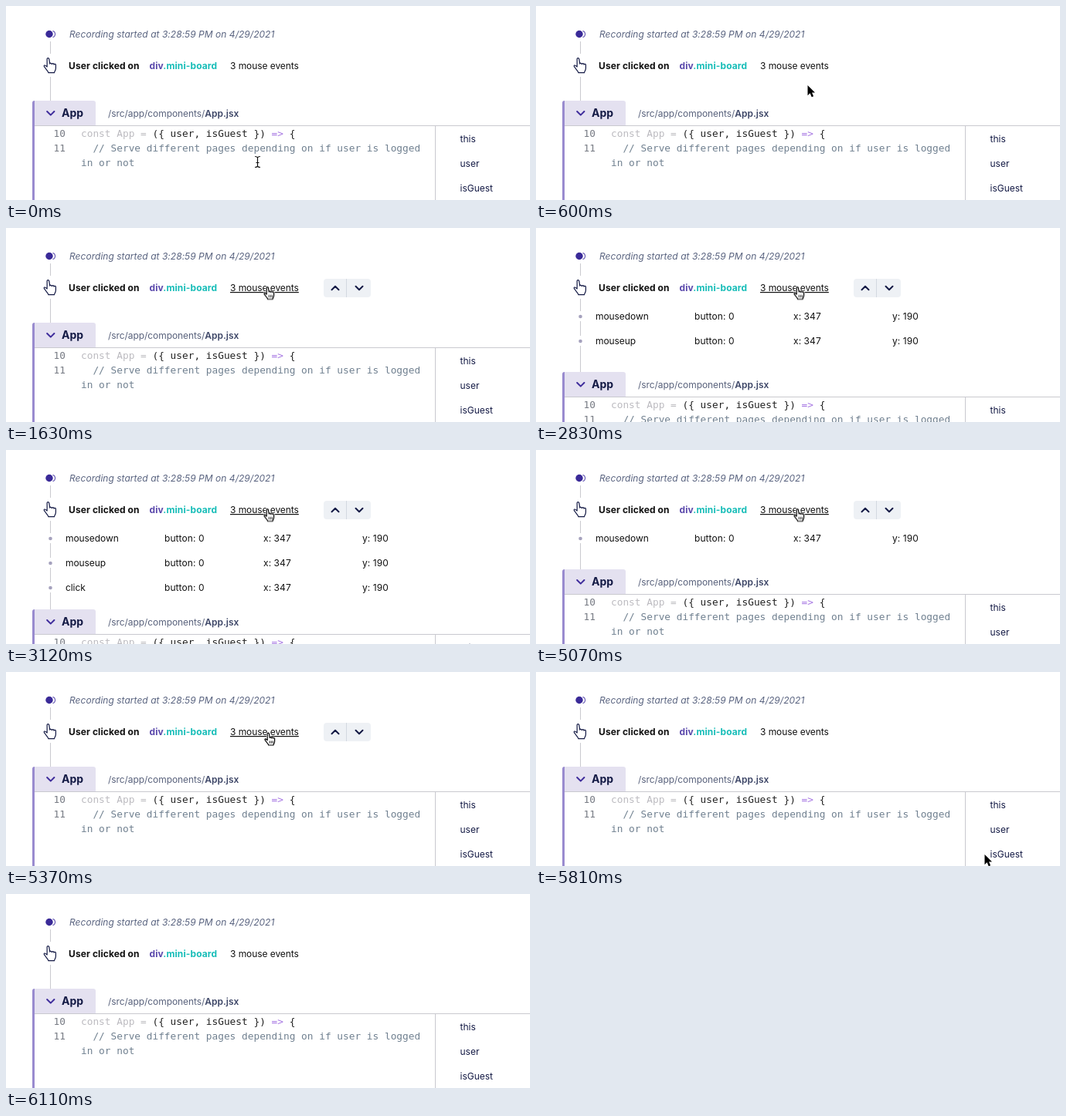
An HTML page that plays this animation: 678 px wide and 252 px high, repeating every 6410 ms.

```html
<!DOCTYPE html>
<html lang="en">
<head>
<meta charset="utf-8">
<title>Event timeline</title>
<style>
html, body { margin: 0; width: 100%; height: 100%; overflow: hidden; background: #fff; }
svg { display: block; width: 678px; height: 252px; font: 12px Inter, sans-serif; fill: #111; }
text { white-space: pre; }
.semi { font-weight: 600; letter-spacing: 0; }
.bold { font-weight: 700; letter-spacing: .1px; }
.tight { letter-spacing: -.07px; }
.loose { letter-spacing: .08px; }
.code { font: 12.8px "DejaVu Sans Mono", monospace; }
.line { stroke: #c9c9cf; fill: none; }
.mark { fill: none; stroke-width: 2; stroke-linecap: round; stroke-linejoin: round; }
.navy { fill: #141a45; }

/* every change in the scene is a hard cut */
.anim { animation: 6410ms step-end infinite; }
#panel { animation-name: panel; }
#chevron { animation-name: chevron; }
#down { animation-name: down; }
#up { animation-name: up; }
#click { animation-name: click; }
#under { animation-name: under; text-underline-offset: 1.5px; text-decoration-thickness: 1px; }
#nav { animation-name: nav; }
#ibeam { animation-name: ibeam; }
#arrow { animation-name: arrow; }
#hand { animation-name: hand; }
.hot { animation-name: hot; }
.cold { animation-name: cold; }

@keyframes panel {
  0%, 83.77% { transform: translateY(0); }
  44.14% { transform: translateY(64px); }
  48.67% { transform: translateY(84px); }
  79.09% { transform: translateY(32px); }
}
@keyframes chevron {
  0%, 79.09% { transform: translateY(0); }
  72.07% { transform: translateY(-1px); }
}
@keyframes down { 0%, 83.77% { opacity: 0; } 44.14% { opacity: 1; } }
@keyframes up { 0%, 79.09% { opacity: 0; } 44.14% { opacity: 1; } }
@keyframes click { 0%, 79.09% { opacity: 0; } 48.67% { opacity: 1; } }
@keyframes under { 0%, 86.11% { text-decoration-line: none; } 16.22% { text-decoration-line: underline; } }
@keyframes nav { 0%, 88.45% { opacity: 0; } 16.22% { opacity: 1; } }
@keyframes hot { 0%, 95.31% { opacity: 0; } 92.97% { opacity: 1; } }
@keyframes cold { 0%, 95.31% { opacity: 1; } 92.97% { opacity: 0; } }
@keyframes ibeam { 0% { opacity: 1; } 2.34% { opacity: 0; } }
@keyframes arrow {
  0%, 16.22%, 92.97% { transform: translate(-99px, 0); }
  2.34% { transform: translate(359px, 244px); }
  4.68% { transform: translate(365px, 239px); }
  7.02% { transform: translate(364px, 220px); }
  9.36% { transform: translate(350px, 102px); }
  11.54% { transform: translate(337px, 68px); }
  13.88% { transform: translate(334px, 76px); }
  86.11% { transform: translate(377px, 131px); }
  88.45% { transform: translate(427px, 162px); }
  90.63% { transform: translate(579px, 236px); }
}
@keyframes hand {
  0%, 86.11% { transform: translate(-99px, 0); }
  16.22%, 25.42% { transform: translate(333px, 75.5px); }
  18.56% { transform: translate(329px, 76.5px); }
  83.77% { transform: translate(334px, 78px); }
}
</style>
</head>
<body>
<svg viewBox="0 0 678 252">
  <defs>
    <path id="finger" stroke-linejoin="round" d="M4.2 10.6C3 9.4 2 8.6 1.3 9 .5 9.5 1.2 10.6 2 11.6L4.6 15C5.2 16 5.5 16 5.6 17H12C12 15.8 13.6 14.5 13.6 12V8.6C13.6 7.2 11.8 7.2 11.6 8.2 11.5 6.6 9.5 6.6 9.3 7.8 9 6.3 7.4 6.3 7.2 7.3L6.4 2.2C6.1.6 4 .8 4.2 2.5z"/>
    <g id="dot">
      <rect x="50" y="-7" width="14" height="13" fill="#fff"/>
      <circle cx="57.5" r="2.3" fill="#a5a1bd"/>
    </g>
    <g id="values" class="loose">
      <text x="205" y="4">button: 0</text>
      <text x="333" y="4">x: 347</text>
      <text x="461" y="4">y: 190</text>
    </g>
  </defs>

  <path class="line" d="M57.5 46V62M57.5 92V210"/>
  <circle cx="56" cy="36.5" r="4.7" fill="#3a2a98"/>
  <path d="M60.5 32.2Q63.6 33.4 63.6 36.5T60.5 40.8" fill="none" stroke="#6a5db5" stroke-width="1.1"/>
  <text x="82" y="41" font-style="italic" letter-spacing=".03" fill="#5a6480">Recording started at 3:28:59 PM on 4/29/2021</text>

  <use href="#finger" transform="translate(48.1 66.3) scale(1.2)" fill="#fff" stroke="#141a45"/>
  <text class="bold" x="81" y="82">User clicked on</text>
  <text class="bold" x="185.5" y="82" fill="#5a48ab">div<tspan fill="#17bdb8">.mini-board</tspan></text>
  <text id="under" class="anim tight" x="290" y="82">3 mouse events</text>

  <g id="nav" class="anim">
    <rect x="411" y="66" width="61" height="24" rx="4" fill="#eef1f5"/>
    <path d="M440.5 66V90" stroke="#d3d8e0"/>
    <path class="mark" stroke="#141a45" d="M421.5 80.3L426 75.8 430.5 80.3M452.5 75.8L457 80.3 461.5 75.8"/>
  </g>

  <g transform="translate(0 115)"><g id="down" class="anim">
    <use href="#dot"/><text class="tight" x="77" y="4">mousedown</text><use href="#values"/>
  </g></g>
  <g transform="translate(0 147)"><g id="up" class="anim">
    <use href="#dot"/><text class="tight" x="77" y="4">mouseup</text><use href="#values"/>
  </g></g>
  <g transform="translate(0 179)"><g id="click" class="anim">
    <use href="#dot"/><text class="tight" x="77" y="4">click</text><use href="#values"/>
  </g></g>

  <g id="panel" class="anim">
    <rect y="123" width="678" height="140" fill="#fff"/>
    <path d="M34 155V126Q34 123 37 123V123H113Q116 123 116 126V155z" fill="#e4e1f0"/>
    <path class="line" d="M37 155.5H678M555.5 156V260"/>
    <path d="M34 260V126Q34 123 37 123V260z" fill="#998bcf"/>
    <path id="chevron" class="anim mark" stroke="#3f2d9c" d="M53.2 137L57.8 141.6 62.4 137"/>
    <text x="72" y="144" font-size="14" font-weight="700" fill="#141a45">App</text>
    <text class="tight" x="132" y="144" fill="#59627c">/src/app/components/<tspan class="semi" fill="#3d4667">App.jsx</tspan></text>

    <rect class="anim hot" x="259" y="158" width="54" height="16" fill="#e4e1f0"/>
    <g class="code" fill="#708090">
      <g fill="#777b84">
        <text x="61.5" y="170">10</text>
        <text x="61.5" y="189">11</text>
      </g>
      <text x="97" y="170" fill="#222"><tspan fill="#bcbbc0">const App = </tspan>({ user, isGuest }) <tspan fill="#a777e3">=&gt;</tspan> {</text>
      <text x="97" y="189">  // Serve different pages depending on if user is logged</text>
      <text x="97" y="208">in or not</text>
    </g>
    <g class="navy">
      <text x="587.5" y="177">this</text>
      <text x="587.5" y="209">user</text>
      <text class="anim cold" x="587.5" y="241">isGuest</text>
      <text class="anim hot semi" x="587.5" y="241">isGuest</text>
    </g>
  </g>

  <path id="ibeam" class="anim" d="M322 195.5Q325 195.5 325.5 197 326 195.5 329 195.5M325.5 197V208M323.5 203.5H327.5M322 209.5Q325 209.5 325.5 208 326 209.5 329 209.5" fill="none" stroke="#111" stroke-width="1.2"/>
  <path id="arrow" class="anim" d="M1.5 1V14.2L4.6 11.3 6.7 16.2 9.1 15.2 7 10.4H11z" fill="#000" stroke="#fff" paint-order="stroke" stroke-width="1.8"/>
  <g id="hand" class="anim">
    <use href="#finger" fill="#fff" stroke="#fff" stroke-width="2.6"/>
    <use href="#finger" fill="#fff" stroke="#000" stroke-width="1.2"/>
    <path d="M7.2 11.5V14.6M9.3 11.5V14.6M11.3 11.5V14.6" stroke="#000" stroke-width=".9"/>
  </g>
</svg>
</body>
</html>
```
